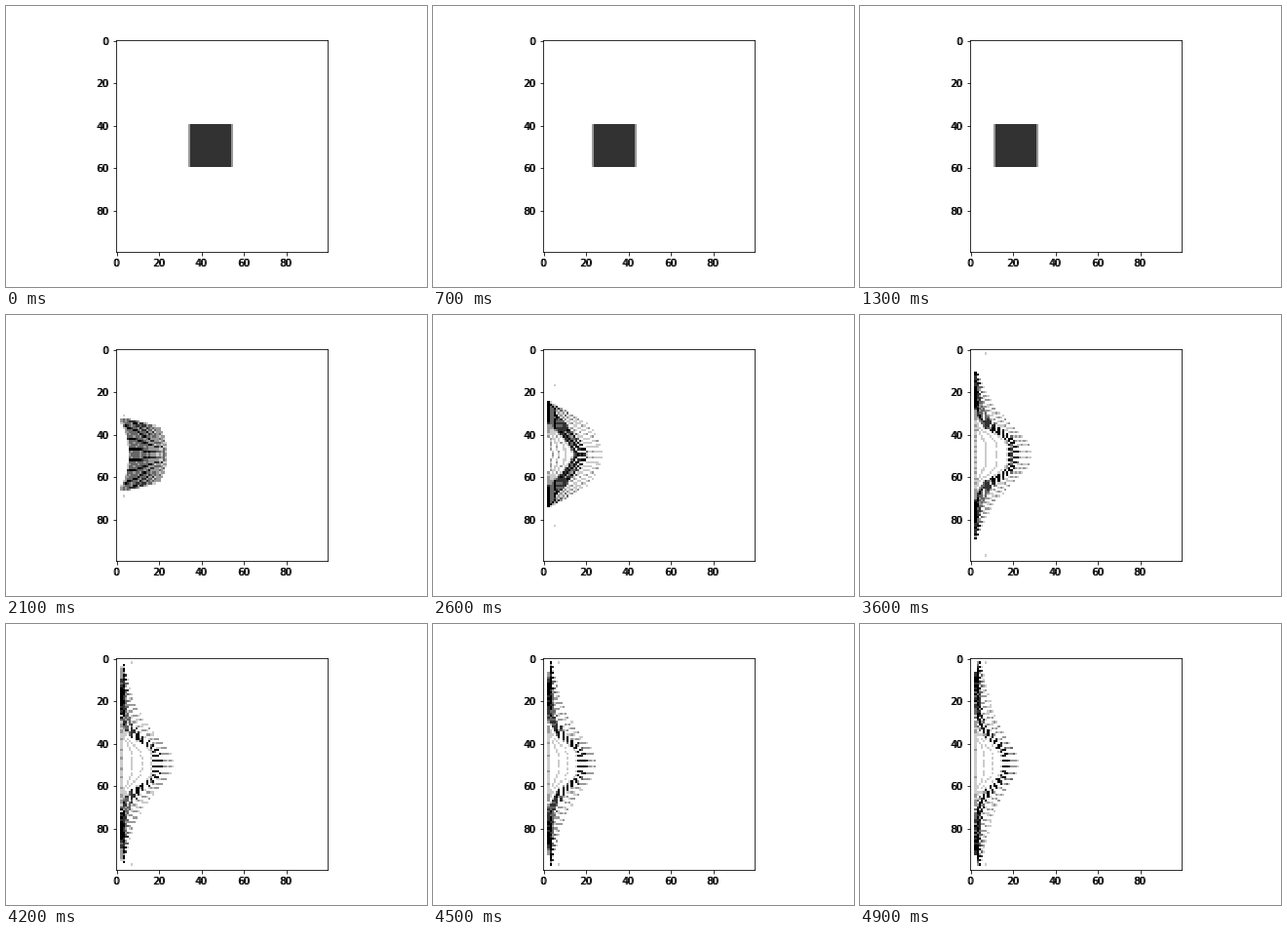
These frames come from a looping animation (432x288 px, 5000 ms). A matplotlib script:

```python
import numpy as np
import matplotlib.pyplot as plt
from matplotlib.animation import FuncAnimation

WIDTH, HEIGHT, DPI = 432, 288, 72
FRAMES, INTERVAL = 50, 100
CELLS, SIDE = 100, 40          # grid cells, particles per block side
MIDDLE, WALL = 50.0, 2.1
IMPACT = 17                    # frame at which the block reaches the wall

plt.rcParams.update({"font.family": "DejaVu Sans", "font.size": 10})

# depth: 0 faces the wall, 1 is the far side; lateral: -1 top, 1 bottom
layers = np.linspace(0, 1, SIDE)
depth, lateral = np.meshgrid(layers, np.linspace(-1, 1, SIDE))


def falling(n):
    """Rigid block accelerating towards the wall."""
    x = 34.7 + 19.5 * depth - 1.324 * n - 0.0348 * n**2
    return np.array([x, MIDDLE + 9.75 * lateral])


def squashed():
    x = WALL + 18 * depth
    return np.array([x, MIDDLE + lateral * (12 - 2 * depth)])


def fan():
    """Block rebounding, with a hollow opening at the wall."""
    spread = 0.8 * depth + 0.2 * depth**6
    inner = WALL + 4.2 * (1 - lateral**2)
    outer = 23.8 - 3.6 * lateral**2
    x = inner + (outer - inner) * spread
    return np.array([x, MIDDLE + lateral * (16.4 - 3.7 * depth**2)])


def arch(reach, height, scale, power, fade, leg=0, taper=0, shear=0.2):
    """Nested bell curves (core, ring, halo) with particles spaced by arc length."""
    def by_depth(values):
        return np.interp(layers, [0, 0.08, 0.8, 1], values)

    t = np.linspace(0, 1, 300)[:, None]
    y = t * by_depth(reach)
    bell = (1 - t**by_depth(fade)) / (1 + (y / by_depth(scale))**by_depth(power))
    x = WALL + by_depth(height) * bell + leg * layers * t * (1 - taper * t**2)
    steps = np.hypot(np.diff(x, axis=0), np.diff(y, axis=0))
    arc = np.vstack([np.zeros(SIDE), np.cumsum(steps, axis=0)])

    a = np.abs(lateral)
    along = (a + shear * depth * a * (1 - a)) * arc[-1]
    px, py = (np.array([np.interp(along[:, j], arc[:, j], curve[:, j])
                        for j in range(SIDE)]).T for curve in (x, y))
    return np.array([px, MIDDLE + np.sign(lateral) * py])


times = np.array([IMPACT, 18, 21, 26, 36, 42, 49], float)
poses = np.array([
    falling(IMPACT),
    squashed(),
    fan(),
    arch([12, 15, 24.4, 24.4], [2, 12.5, 19, 25], [100] * 4, [2] * 4,
         [1.5, 1.4, 1.3, 2.5], shear=0.5),
    arch([14, 25, 39, 39], [0.8, 16, 20.5, 26], [9, 11, 13, 17],
         [4, 5, 3, 2.5], [4] * 4, leg=4, taper=0.9),
    arch([16, 32, 46.2, 46.2], [0.8, 15, 19.5, 24], [9, 11, 13, 17],
         [4, 5, 3, 2.4], [4] * 4, leg=4, taper=0.7),
    arch([18, 40, 47.6, 47.6], [0.8, 12.8, 16.2, 20], [9, 11, 13, 18],
         [4, 4, 3, 2], [6] * 4, leg=3.5, taper=0.3),
])
slopes = np.gradient(poses, times, axis=0)


def splashing(n):
    """Cubic Hermite path through the poses."""
    i = min(np.searchsorted(times, n, side="right") - 1, len(times) - 2)
    span = times[i + 1] - times[i]
    s = (n - times[i]) / span
    x, y = ((1 + 2 * s) * (1 - s)**2 * poses[i]
            + s * (1 - s)**2 * span * slopes[i]
            + s**2 * (3 - 2 * s) * poses[i + 1]
            + s**2 * (s - 1) * span * slopes[i + 1])
    if n > 19:
        # the two corner particles shoot ahead along the wall
        shot = min(19 + 2.8 * (n - 21), 47.6)
        x[[0, -1], 0] = min(3.6 + 0.35 * (n - 21), 7.2)
        y[[0, -1], 0] = MIDDLE - shot, MIDDLE + shot
    return np.array([np.maximum(x, 2.05), np.clip(y, 2.1, 97.9)])


def density(n):
    x, y = falling(n) if n < IMPACT else splashing(n)
    limits = [[0, CELLS], [0, CELLS]]
    return np.histogram2d(y.ravel(), x.ravel(), bins=CELLS, range=limits)[0]


def add_axes(name, shift=0):
    size = 0.755 * HEIGHT
    left = 0.5125 * WIDTH - size / 2 + shift
    ax = fig.add_axes([left / WIDTH, 0.125, size / WIDTH, 0.755],
                      label=name, facecolor="none")
    ax.set(xlim=(-0.5, 99.5), ylim=(99.5, -0.5),
           xticks=range(0, 100, 20), yticks=range(0, 100, 20))
    return ax


fig = plt.figure(figsize=(WIDTH / DPI, HEIGHT / DPI), dpi=DPI, facecolor="white")
ax = add_axes("grid")
image = ax.imshow(density(0), cmap="gray_r", vmin=0, vmax=5,
                  interpolation="nearest", aspect="auto")

# a second, shifted set of labels gives them their heavy strokes
echo = add_axes("labels", shift=-1)
echo.spines[:].set_visible(False)
echo.tick_params(length=0, pad=7)


def update(n):
    image.set_data(density(n))
    return [image]


animation = FuncAnimation(fig, update, frames=FRAMES, interval=INTERVAL,
                          repeat=True, repeat_delay=0)
plt.show()
```
